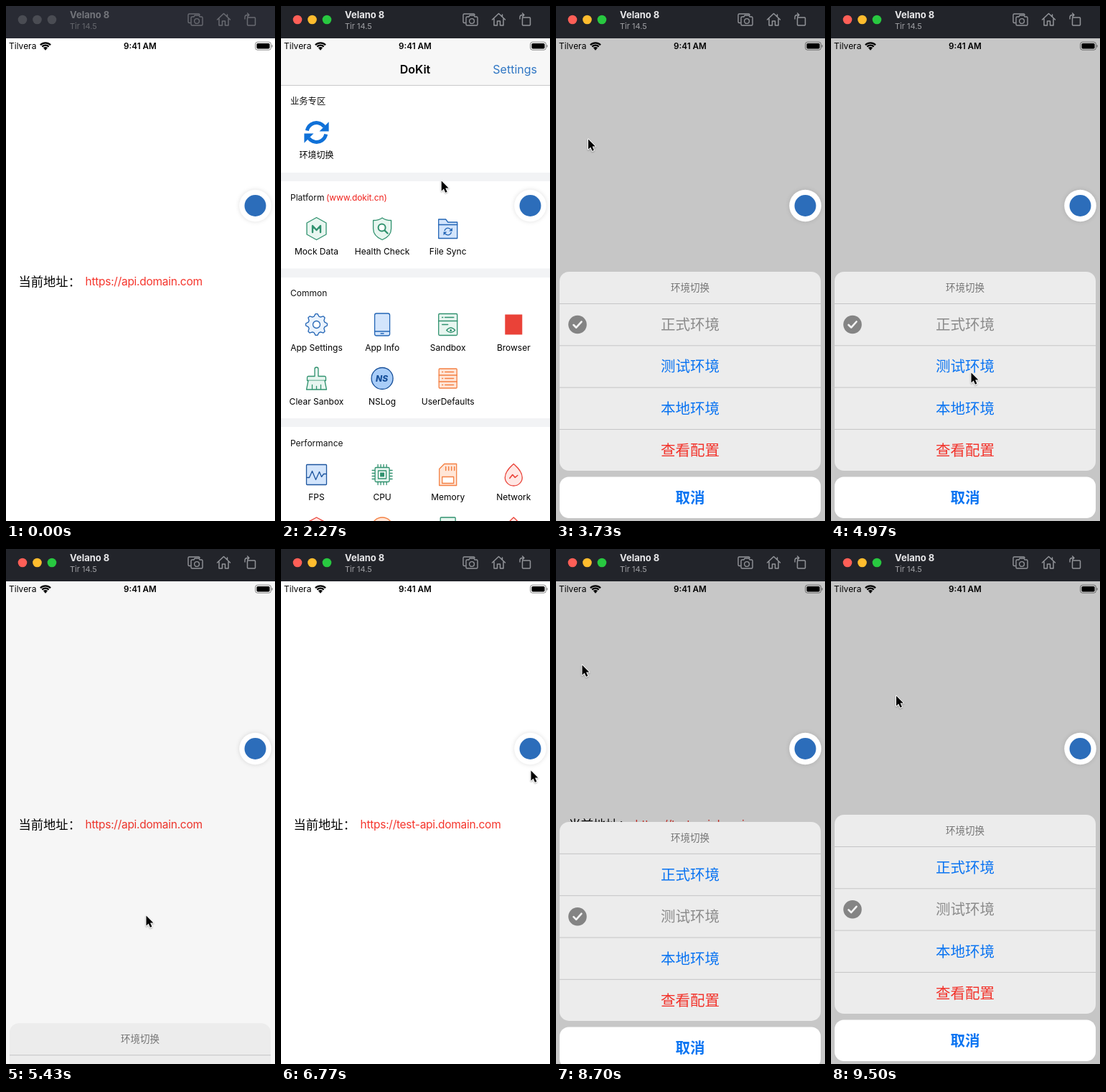
These frames come from a looping animation (375 px wide and 717 px high, 9.53 s). An HTML page with a canvas:

```html
<!DOCTYPE html>
<html lang="zh-CN">
<head>
<meta charset="utf-8">
<title>Environment switch</title>
<style>
html, body { margin: 0; width: 100%; height: 100%; overflow: hidden; background: #fff; }
canvas { display: block; width: 375px; height: 717px; }
</style>
</head>
<body>
<canvas id="stage"></canvas>
<script>
const W = 375, H = 717, LOOP = 9530;
const canvas = document.getElementById('stage');
const ctx = canvas.getContext('2d');
const dpr = window.devicePixelRatio || 1;
canvas.width = W * dpr;
canvas.height = H * dpr;

const FONT = 'Inter, "Noto Sans CJK SC", "Noto Sans CJK", sans-serif';
const GREEN = '#31926f', MINT = '#e8f6f0', BLUE = '#2365b5', SKY = '#d3e5fc';
const ORANGE = '#f48043', PEACH = '#ffe6d8', RED = '#ea4238', PINK = '#ffe7e4';
const LINK = '#0a74f2';

// Times of the events in ms
const FOCUS = 1230, URL_CHANGE = 5700;
const MENUS = [[1310, 3085], [7210, 8400]];
const SHEETS = [
  { open: 3085, close: 5250, checked: 0 },
  { open: 8400, close: Infinity, checked: 1 }
];

// Pointer stops: time, x, y
const POINTER = [
  [480, 374, 345], [1070, 347, 283], [1700, 347, 283], [3000, 44.5, 185],
  [3850, 44.5, 185], [4880, 195, 510], [6130, 195, 510], [6770, 348, 308],
  [6930, 347, 283], [7300, 347, 283], [8170, 36, 161], [9130, 36, 161],
  [9500, 90.5, 204]
];

function text(str, x, cy, size, color, { weight = 400, align = 'left', spacing = 0, italic = '' } = {}) {
  ctx.font = `${italic} ${weight} ${size}px ${FONT}`;
  ctx.letterSpacing = spacing + 'px';
  ctx.textAlign = align;
  ctx.fillStyle = color;
  ctx.fillText(str, x, cy + size * 0.37);
}

function rect(x, y, w, h, color) {
  ctx.fillStyle = color;
  ctx.fillRect(x, y, w, h);
}

function paint(path, stroke, fill, width = 1.3) {
  if (fill) { ctx.fillStyle = fill; ctx.fill(path); }
  if (stroke) { ctx.strokeStyle = stroke; ctx.lineWidth = width; ctx.stroke(path); }
}

function shape(d, stroke, fill, width) {
  paint(new Path2D(d), stroke, fill, width);
}

function round(x, y, w, h, r, stroke, fill, width) {
  const p = new Path2D();
  p.roundRect(x, y, w, h, r);
  paint(p, stroke, fill, width);
}

function circle(x, y, r, stroke, fill, width) {
  const p = new Path2D();
  p.arc(x, y, r, 0, Math.PI * 2);
  paint(p, stroke, fill, width);
}

function at(x, y, draw) {
  ctx.save();
  ctx.translate(x, y);
  ctx.lineJoin = ctx.lineCap = 'round';
  draw();
  ctx.restore();
}

function syncArrows(r, width, color) {
  ctx.save();
  ctx.lineCap = 'butt';
  for (let i = 0; i < 2; i++) {
    ctx.beginPath();
    ctx.arc(0, 0, r, Math.PI * 1.06, Math.PI * 1.8);
    ctx.strokeStyle = color;
    ctx.lineWidth = width;
    ctx.stroke();
    ctx.beginPath();
    ctx.moveTo(r * 1.28, -r * 1.1);
    ctx.lineTo(r * 1.28, -r * 0.12);
    ctx.lineTo(r * 0.3, -r * 0.12);
    ctx.fillStyle = color;
    ctx.fill();
    ctx.rotate(Math.PI);
  }
  ctx.restore();
}

function gear() {
  const p = new Path2D();
  for (let i = 0; i < 32; i++) {
    const a = (i - 1.5) * Math.PI / 16;
    const r = i % 4 === 1 || i % 4 === 2 ? 15 : 11.8;
    p.lineTo(r * Math.cos(a), r * Math.sin(a));
  }
  p.closePath();
  paint(p, BLUE, '#eaf3fe');
  circle(0, 0, 5, BLUE, '#fff');
}

function drop() {
  shape('M0-15C4-11 12-5 12 4A12 11.5 0 0 1-12 4C-12-5-4-11 0-15Z', RED, PINK);
}

const icons = {
  env() { syncArrows(13.4, 5, '#1071d8'); },
  mock() {
    shape('M0-15.5L13.5-8V8L0 15.5L-13.5 8V-8Z', GREEN, MINT);
    shape('M-5.5 5V-4L0 2L5.5-4V5', GREEN, null, 2.4);
  },
  health() {
    shape('M0-15C4-12 8-11.5 12.5-11.5V0C12.5 8 6 13 0 15.5C-6 13-12.5 8-12.5 0V-11.5C-8-11.5-4-12 0-15Z', GREEN, MINT);
    circle(-0.5, -1.5, 5, GREEN, '#fff', 2);
    shape('M3.5 2.5L7.5 6.5', GREEN, null, 2.4);
  },
  folder() {
    shape('M-13-13H-3L0-9H13V13.5H-13Z', BLUE, SKY);
    shape('M-13-5.5H13', BLUE);
    at(0, 4, () => syncArrows(4.8, 1.3, BLUE));
  },
  gear,
  phone() {
    round(-10.5, -15.5, 21, 31, 2.5, BLUE, SKY);
    shape('M-10 9.5H10M-2 12.5H2', BLUE);
  },
  sandbox() {
    round(-13, -15, 26, 30, 1.5, GREEN, MINT);
    shape('M-13-5H13M-8-10H-7M-4-10H8', GREEN, null, 1.6);
    shape('M-8 0H0', GREEN, null, 1.3);
    shape('M-2 8Q4 1 10 8Q4 14-2 8Z', GREEN, '#fff');
    circle(4, 8, 1.6, null, GREEN);
  },
  browser() { rect(-12, -14, 24, 28, RED); },
  broom() {
    shape('M-2.5-3V-13A2.5 2.5 0 0 1 2.5-13V-3H11.5Q13-3 13-1V3H-13V-1Q-13-3-11.5-3Z', GREEN, MINT);
    shape('M-11.5 3L-14 15.5H14L11.5 3M-6 15V9M0 15V11M6 15V9', GREEN, MINT);
  },
  log() {
    circle(0, 0, 15, '#164f99', '#a9cdf8');
    text('NS', -0.5, 0, 12, '#164f99', { weight: 800, align: 'center', italic: 'italic' });
  },
  list() {
    round(-12.5, -13.5, 25, 27, 1, ORANGE, PEACH);
    shape('M-12.5-4.5H12.5M-12.5 4.5H12.5M-8-9H-7M-4-9H8M-8 0H-7M-4 0H8M-8 9H-7M-4 9H8', ORANGE);
  },
  wave() {
    round(-14, -14, 28, 28, 1, '#1d559e', SKY);
    shape('M-13 4H-10L-6-5L-1 7L4-4L7 3L10-1H13', '#1d559e');
  },
  chip() {
    for (let i = 0; i < 4; i++) {
      shape('M-6-14V-10M-2-14V-10M2-14V-10M6-14V-10', GREEN);
      ctx.rotate(Math.PI / 2);
    }
    round(-10, -10, 20, 20, 1.5, GREEN, MINT);
    round(-5.5, -5.5, 11, 11, 0, GREEN, '#fff');
    rect(-3, -3, 6, 6, GREEN);
  },
  card() {
    shape('M-5-15H12V15H-12V-8Z', ORANGE, PEACH);
    shape('M-3-11V-6M1-11V-6M5-11V-6M9-11V-6', ORANGE, null, 1.5);
    round(-8, 3, 16, 9, 0, ORANGE, '#fff');
  },
  network() {
    drop();
    shape('M-5.5 5L-1.5 0L2 4L5.5 1', RED, null, 1.6);
  },
  hexagon() { shape('M0-15L13-8V8L0 15L-13 8V-8Z', RED, PINK); },
  disc() { circle(0, 0, 15, ORANGE, PEACH); },
  page() { round(-10.5, -15, 21, 30, 1, GREEN, MINT); },
  drop
};

const ROWS = [
  { y: 176, label: 208, items: [['env', '环境切换']] },
  { y: 310, label: 341.5, items: [['mock', 'Mock Data'], ['health', 'Health Check'], ['folder', 'File Sync']] },
  { y: 443.5, label: 475.5, items: [['gear', 'App Settings'], ['phone', 'App Info'], ['sandbox', 'Sandbox'], ['browser', 'Browser']] },
  { y: 518.5, label: 550.5, items: [['broom', 'Clear Sanbox'], ['log', 'NSLog'], ['list', 'UserDefaults']] },
  { y: 652.5, label: 684, items: [['wave', 'FPS'], ['chip', 'CPU'], ['card', 'Memory'], ['network', 'Network']] },
  { y: 727, label: 760, items: [['hexagon', ''], ['disc', ''], ['page', ''], ['drop', '']] }
];

function drawMenu() {
  rect(0, 45, W, 65, '#f7f7f7');
  rect(0, 110, W, 1, '#c9c9ca');
  text('DoKit', 187, 88, 16, '#000', { weight: 600, align: 'center' });
  text('Settings', 357, 88, 16, '#2f76c4', { align: 'right' });
  for (const [y, h] of [[232, 12], [365.5, 12.5], [574, 12]]) rect(0, y, W, h, '#f2f3f5');
  text('业务专区', 13, 132.5, 12.3, '#111');
  text('Platform', 13, 266.5, 12, '#111');
  text('(www.dokit.cn)', 63, 266.5, 12, '#f0211c', { spacing: -0.1 });
  text('Common', 13, 400, 12, '#111');
  text('Performance', 13, 608.5, 12, '#111');
  for (const row of ROWS) {
    row.items.forEach(([icon, label], i) => {
      const x = 49.5 + i * 91.6;
      at(x, row.y, icons[icon]);
      text(label, x, row.label, 12, '#000', { align: 'center' });
    });
  }
}

function drawHome(t) {
  const host = t < URL_CHANGE ? 'api' : 'test-api';
  text('当前地址：', 17.5, 383.5, 17.3, '#000');
  text(`https://${host}.domain.com`, 110.5, 383.5, 15.5, '#f5352c', { spacing: -0.27 });
}

function settle(ms) {
  const u = Math.max(0, ms) * 0.018;
  return 1 - (1 + u) * Math.exp(-u);
}

function drawSheet(level, checked) {
  rect(0, 45, W, H - 45, `rgba(0,0,0,${0.225 * level})`);
  at(0, (1 - level) * 347, () => {
    round(5, 370, 364, 277, 13, null, '#ececec');
    text('环境切换', 187, 392, 13.5, '#747474', { weight: 500, align: 'center' });
    ['正式环境', '测试环境', '本地环境', '查看配置'].forEach((label, i) => {
      const y = 443.5 + i * 58.3;
      rect(5, y - 29.5, 364, 1, '#c5c5c6');
      const color = i === checked ? '#8b8b8b' : i === 3 ? '#f2332b' : LINK;
      text(label, 187, y, 20.5, color, { align: 'center' });
      if (i !== checked) return;
      circle(30, y, 12.8, null, '#848484');
      shape(`M24.5 ${y + 0.5}L28.2 ${y + 4.2}L35.5 ${y - 4}`, '#f4f4f4', null, 2.6);
    });
    round(5, 655.5, 364, 57.5, 13, null, '#fff');
    text('取消', 187, 684.5, 20.5, LINK, { weight: 700, align: 'center' });
  });
}

function drawTitleBar(active) {
  rect(0, 0, W, 45, active ? '#22242a' : '#292b34');
  ['#fe5f57', '#febc2e', '#28c840'].forEach((color, i) =>
    circle(23 + i * 20.5, 19, 6.3, null, active ? color : '#4a4c53'));
  text('Velano 8', 89, 12.5, 13, active ? '#e8e8ea' : '#72747a', { weight: 700 });
  text('Tir 14.5', 89, 28, 11, active ? '#a0a1a5' : '#66686e');
  const ink = active ? '#929499' : '#696b72';
  at(264, 19, () => {
    shape('M-7 4.5H-8.5Q-10 4.5-10 3V-6.5Q-10-8-8.5-8H4.5Q6-8 6-6.5', ink, null, 1.4);
    shape('M-4.5-4H-2L-1-6H5L6-4H8.5Q10-4 10-2.5V6.5Q10 8 8.5 8H-4.5Q-6 8-6 6.5V-2.5Q-6-4-4.5-4Z', ink, null, 1.4);
    circle(2, 2, 3.4, ink, null, 1.4);
  });
  at(303.5, 19, () => {
    shape('M-9 0L0-8.5L9 0M-6.5-1.5V8H-2V2H2V8H6.5V-1.5M5-7V-4.5', ink, null, 1.5);
  });
  at(341, 19, () => {
    round(-4.5, -3, 11, 11, 1, ink, null, 1.5);
    shape('M-8-1V-3Q-8-6.5-4.5-6.5H-2M-4.5-9L-2-6.5L-4.5-4', ink, null, 1.4);
  });
}

function drawStatus() {
  text('Tilvera', 4, 56, 12, '#000');
  text('9:41 AM', 187, 56, 11.7, '#000', { weight: 600, align: 'center' });
  for (const r of [3.2, 6.6, 10]) {
    ctx.beginPath();
    ctx.arc(55, 61.3, r, Math.PI * 1.25, Math.PI * 1.75);
    ctx.strokeStyle = '#000';
    ctx.lineWidth = 2.3;
    ctx.stroke();
  }
  circle(55, 60, 1.4, null, '#000');
  round(347.6, 50.2, 21.8, 11, 3, 'rgba(0,0,0,.45)', null, 1);
  round(349.4, 52, 18.2, 7.4, 1.6, null, '#000');
  round(370.4, 54, 1.3, 3.6, 1, null, 'rgba(0,0,0,.45)');
}

function drawFloatingButton() {
  ctx.save();
  ctx.shadowColor = 'rgba(0,0,0,.13)';
  ctx.shadowBlur = 6 * dpr;
  circle(347.5, 278, 22.3, null, '#fff');
  ctx.restore();
  circle(347.5, 278, 15, null, '#2c6dba');
}

function drawPointer(t) {
  const next = POINTER.findIndex(k => k[0] > t);
  if (next === 0) return;
  const [t1, x1, y1] = POINTER[next < 0 ? POINTER.length - 1 : next];
  const [t0, x0, y0] = POINTER[next < 0 ? POINTER.length - 1 : next - 1];
  const u = t1 > t0 ? (t - t0) / (t1 - t0) : 1;
  const s = u * u * (3 - 2 * u);
  at(x0 + (x1 - x0) * s, y0 + (y1 - y0) * s, () => {
    ctx.shadowColor = 'rgba(0,0,0,.3)';
    ctx.shadowBlur = 2 * dpr;
    ctx.shadowOffsetY = dpr;
    const arrow = 'M.5.5V14.5L3.7 11.5L6 16.8L8.4 15.8L6.1 10.6H10.4Z';
    shape(arrow, '#fff', null, 2);
    ctx.shadowColor = 'transparent';
    shape(arrow, null, '#000');
  });
}

function draw(t) {
  ctx.setTransform(dpr, 0, 0, dpr, 0, 0);
  rect(0, 0, W, H, '#fff');
  if (MENUS.some(([from, to]) => t >= from && t < to)) {
    drawMenu();
  } else {
    drawHome(t);
    for (const s of SHEETS) {
      const level = settle(t - s.open) * (1 - settle(t - s.close));
      if (level > 0.002) drawSheet(level, s.checked);
    }
  }
  drawTitleBar(t >= FOCUS);
  drawStatus();
  drawFloatingButton();
  drawPointer(t);
}

function frame() {
  draw(performance.now() % LOOP);
  requestAnimationFrame(frame);
}
frame();
</script>
</body>
</html>
```
